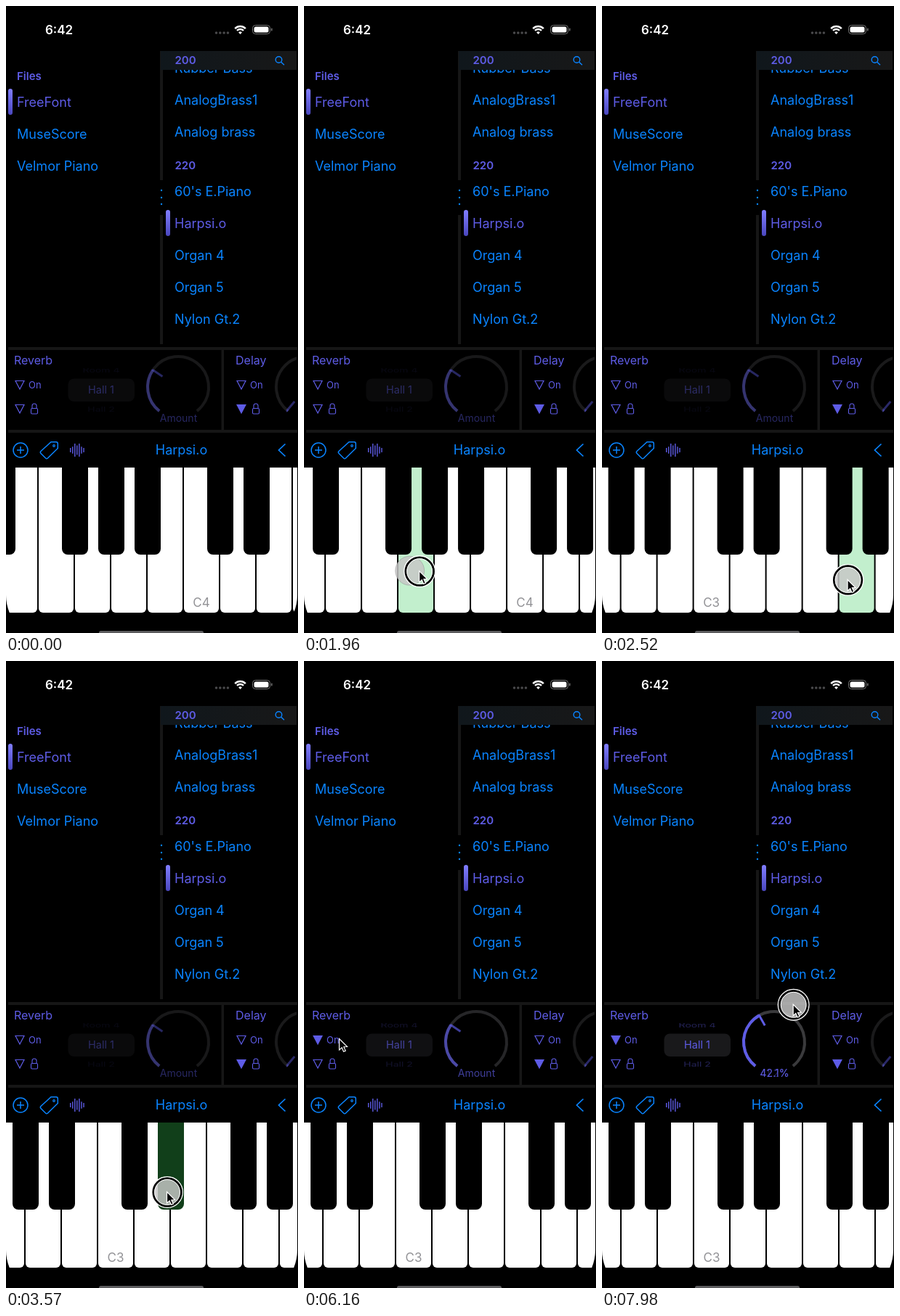
Animation of 402x864 px, one loop 8 s. Source, as an HTML page with a canvas:

```html
<!DOCTYPE html>
<html lang="en">
<head>
<meta charset="utf-8">
<title>Synth keyboard</title>
<style>
html, body { margin: 0; width: 100%; height: 100%; overflow: hidden; background: #000; }
canvas { display: block; width: 402px; height: 864px; }
</style>
</head>
<body>
<canvas id="stage"></canvas>
<script>
const W = 402, H = 864, LOOP = 8000, TICK = 70, KEY = 50, TOUCH_LAG = 27;
const BLUE = '#0a84ff', PURPLE = '#5e5ce6', LINE = '#161616';
const canvas = document.getElementById('stage');
const ctx = canvas.getContext('2d');
const dpr = window.devicePixelRatio || 1;
canvas.width = W * dpr;
canvas.height = H * dpr;

// Quick start and soft landing, like a hand on a mouse.
function ease(t, from, to) {
  const u = Math.min(1, Math.max(0, (t - from) / (to - from)));
  const v = 1 - (1 - u) ** 1.5;
  return v * v * (3 - 2 * v);
}

// The pointer rests between moves.
const moves = [
  { from: 490, to: 770, x: 188, y: 800 },
  { from: 910, to: 1470, x: 96, y: 774 },
  { from: 1766, to: 2590, x: 338, y: 790 },
  { from: 2800, to: 3430, x: 221, y: 731 },
  { from: 3780, to: 4410, x: 152, y: 804 },
  { from: 4850, to: 5180, x: 116, y: 543 },
  { from: 5390, to: 5670, x: 48, y: 520 },
  { from: 6230, to: 7280, x: 258, y: 529 },
  { from: 7430, to: 8200, x: 263, y: 469 }
];

// White and black indexes count white keys from middle C.
const presses = [
  { from: 1680, to: 2660, white: -3 },
  { from: 3570, to: 3850, black: -6 },
  { from: 4480, to: 4760, white: -7 },
  { from: 5880, to: 6020 },
  { from: 7490, to: LOOP }
];

function pointerAt(t) {
  return moves.reduce((p, m) => {
    const k = ease(t, m.from, m.to);
    return { x: p.x + (m.x - p.x) * k, y: p.y + (m.y - p.y) * k };
  }, { x: 198, y: 866 });
}

const middleC = t => 244 + 232 * ease(t, 1832, 2580);
const amount = t => 30.1 + (t < 7430 ? 0 : (529 - pointerAt(t).y) * 0.214);

function text(str, x, y, size, color, align = 'left', weight = 400) {
  ctx.font = `${weight} ${size}px Inter, sans-serif`;
  ctx.textAlign = align;
  ctx.fillStyle = color;
  ctx.fillText(str, x, y);
}

function rect(x, y, w, h, color, radius = 0) {
  ctx.fillStyle = color;
  ctx.beginPath();
  ctx.roundRect(x, y, w, h, radius);
  ctx.fill();
}

function stroke(color, width) {
  ctx.strokeStyle = color;
  ctx.lineWidth = width;
  ctx.stroke();
}

function path(points, closed) {
  ctx.beginPath();
  points.forEach(([x, y]) => ctx.lineTo(x, y));
  if (closed) ctx.closePath();
}

function line(color, width, ...points) {
  path(points);
  stroke(color, width);
}

function arc(x, y, r, color, width, a = 0, b = 2 * Math.PI) {
  ctx.beginPath();
  ctx.arc(x, y, r, a, b);
  stroke(color, width);
}

function disc(x, y, r, color) {
  ctx.fillStyle = color;
  ctx.beginPath();
  ctx.arc(x, y, r, 0, 2 * Math.PI);
  ctx.fill();
}

function gradient(x0, y0, x1, y1, from, to) {
  const g = ctx.createLinearGradient(x0, y0, x1, y1);
  g.addColorStop(0, from);
  g.addColorStop(1, to);
  return g;
}

function withAlpha(alpha, draw) {
  ctx.save();
  ctx.globalAlpha *= alpha;
  draw();
  ctx.restore();
}

function clipped(x, y, w, h, draw, radius = 0) {
  ctx.save();
  ctx.beginPath();
  ctx.roundRect(x, y, w, h, radius);
  ctx.clip();
  draw();
  ctx.restore();
}

function statusBar() {
  text('6:42', 54, 39, 17, '#fff', 'left', 600);
  for (let i = 0; i < 4; i++) disc(289.5 + i * 5.3, 37, 1.8, '#4a4a4c');
  const up = -Math.PI / 2;
  [10.4, 6.4].forEach(r => arc(322.5, 38.5, r, '#fff', 2.5, up - 0.78, up + 0.78));
  arc(322.5, 39, 1.8, '#fff', 3.6, up - 0.75, up + 0.75);
  ctx.beginPath();
  ctx.roundRect(339.5, 26.5, 24, 12, 4);
  stroke('#777', 1);
  rect(341.5, 28.5, 20, 8, '#fff', 2.5);
  rect(365, 30.5, 1.5, 4, '#777', 1);
}

function marker(x, y) {
  rect(x, y, 6, 36, gradient(0, y, 0, y + 36, '#817eff', '#4a47be'), 3);
}

function column(x, y, rows, selected) {
  rows.forEach((s, i) => text(s, x, y + 44 * i, 18, i === selected ? PURPLE : BLUE));
}

function lists() {
  text('Files', 15, 102, 15, PURPLE, 'left', 600);
  marker(3, 114);
  column(15, 139, ['FreeFont', 'MuseScore', 'Velmor Piano'], 0);

  [62, 288].forEach(y => rect(212, y, 4, 178, LINE));
  [254, 264, 273].forEach(y => disc(214, y, 1.2, BLUE));

  rect(213, 62, 187, 26, gradient(213, 0, 400, 0, '#10171c', '#181818'));
  clipped(216, 88, 184, 12, () => text('Rubber Bass', 232, 92, 18, BLUE));
  text('200', 232.5, 80, 15, PURPLE, 'left', 600);
  arc(375.5, 74, 4.3, BLUE, 1.4);
  line(BLUE, 1.5, [378.7, 77.2], [383, 81.3]);

  column(232, 136, ['AnalogBrass1', 'Analog brass']);
  text('220', 232.5, 225, 15, PURPLE, 'left', 600);
  marker(220, 281);
  column(232, 262, ["60's E.Piano", 'Harpsi.o', 'Organ 4', 'Organ 5', 'Nylon Gt.2'], 1);
}

function triangle(x, y, filled) {
  path([[x - 6, y - 5.5], [x + 6, y - 5.5], [x, y + 6]], true);
  if (filled) {
    ctx.fillStyle = PURPLE;
    ctx.fill();
  }
  stroke(PURPLE, 1.2);
}

function switches(title, x, on, locked) {
  text(title, x, 494, 16, PURPLE);
  triangle(x + 8, 522, on);
  text('On', x + 20, 527, 13, PURPLE);
  triangle(x + 8, 555, locked);
  ctx.beginPath();
  ctx.roundRect(x + 23.5, 554.5, 9, 7.5, 1.5);
  ctx.moveTo(x + 25, 554.5);
  ctx.arc(x + 28, 551, 3, Math.PI, 0);
  ctx.lineTo(x + 31, 554.5);
  stroke(PURPLE, 1.1);
}

function knob(x, y, degrees) {
  const rad = d => d * Math.PI / 180;
  const a = rad(degrees), c = Math.cos(a), s = Math.sin(a);
  arc(x, y, 42, '#3a3a3c', 4, rad(128), rad(412));
  arc(x, y, 42, PURPLE, 4, rad(128), a);
  line(PURPLE, 3, [x + 43 * c, y + 43 * s], [x + 26 * c, y + 26 * s]);
}

// Neighbouring wheel entries look tilted away from the viewer.
function wheelEntry(label, y, top) {
  clipped(85, top, 92, 9, () => {
    ctx.translate(131, y);
    ctx.scale(1, 0.62);
    text(label, 0, 0, 14, PURPLE, 'center');
  });
}

function effects(t) {
  rect(3, 470, 398, 4, LINE);
  rect(3, 584, 398, 4, LINE);
  rect(296.5, 474, 3.5, 110, LINE);

  const on = ease(t, 6020, 6440), readout = ease(t, 7420, 7700);
  const value = amount(t), lagged = amount(t - TICK);
  const caption = (str, alpha) => withAlpha(alpha, () => text(str, 237.5, 573, 14, PURPLE, 'center'));

  switches('Reverb', 11, t >= 6020, false);
  withAlpha(0.42 + 0.58 * on, () => {
    rect(85.5, 513.5, 91.5, 31.5, '#19191b', 8);
    text('Hall 1', 131, 534, 14.5, PURPLE, 'center');
    withAlpha(0.2 + 0.18 * on, () => {
      wheelEntry('Room 4', 505, 499);
      wheelEntry('Hall 2', 559, 551);
    });
    knob(237, 525, 214 + (lagged - 30.1) * 2.4);
    caption('Amount', 1 - readout);
    caption(value.toFixed(1) + '%', readout);
    caption(lagged.toFixed(1) + '%', readout * 0.35);
  });

  switches('Delay', 316, false, true);
  clipped(300, 474, 100, 110, () => withAlpha(0.45, () => knob(414, 525, 130)));
}

function toolbar() {
  arc(20, 612, 10, BLUE, 1.5);
  line(BLUE, 1.5, [15, 612], [25, 612]);
  line(BLUE, 1.5, [20, 607], [20, 617]);

  ctx.stroke(new Path2D('M62 600.8H69Q71.3 600.8 71.3 603.2V609.5L57.5 623Q56 624.4 54.5 623L48 616.5Q46.6 615 48 613.5Z'));
  arc(66, 606, 1.3, BLUE, 1.2);

  for (let i = 0; i < 7; i++) {
    const x = 88.7 + i * 3.05;
    const h = 3 + (i % 2 ? 3.5 : 7) * Math.sin(Math.PI * i / 6);
    line(PURPLE, 1.4, [x, 612 - h], [x, 612 + h]);
  }
  text('Harpsi.o', 241.5, 618, 18, BLUE, 'center');
  line(BLUE, 1.7, [384.5, 603.5], [375.5, 612], [384.5, 620.5]);
}

function keyboard(t, press) {
  const left = middleC(t);
  const first = Math.floor(-left / KEY) - 1;
  const keys = Array.from({ length: 11 }, (_, i) => first + i);
  const degree = i => (i + 70) % 7;
  clipped(0, 0, 401, 874, () => {
    for (const i of keys) {
      const x = left + KEY * i;
      rect(x + 1, 636, KEY - 2, 200, press?.white === i ? '#c2efcd' : '#fff', [0, 0, 6, 6]);
      if (degree(i) === 0) text('C' + (4 + i / 7), x + 25, 828, 17, '#929296', 'center');
    }
    for (const i of keys) {
      if (degree(i) === 2 || degree(i) === 6) continue;
      rect(left + KEY * i + 33, 636, 36, 120, press?.black === i ? '#113f1a' : '#000', [0, 0, 8, 8]);
    }
  }, 62);
  rect(128, 861, 144, 5, '#5c5c5e', 2.5);
}

function pointer(t, press) {
  if (t < 560) return;
  const { x, y } = pointerAt(t);
  if (press) {
    const touch = pointerAt(t - TOUCH_LAG);
    disc(touch.x + 1, touch.y + 1, 20, 'rgba(199,199,199,0.83)');
    arc(touch.x + 1, touch.y + 1, 20, 'rgba(120,120,120,0.5)', 0.7);
    arc(x + 1, y + 1, 21.3, '#fff', 1.4);
    arc(x + 1, y + 1, 19.2, '#000', 2.8);
    arc(x + 1, y + 1, 17.4, '#fff', 1);
  }
  ctx.save();
  ctx.translate(x + 0.5, y + 0.5);
  path([[0, 0], [0, 15.5], [3.6, 12.2], [6, 17.8], [8.7, 16.6], [6.3, 11.2], [11, 11]], true);
  ctx.fillStyle = '#000';
  ctx.fill();
  stroke('#fff', 1.2);
  ctx.restore();
}

function draw(now) {
  const t = Math.floor((now % LOOP) / TICK) * TICK;
  const press = presses.find(p => t >= p.from && t < p.to);
  ctx.setTransform(dpr, 0, 0, dpr, 0, 0);
  ctx.fillStyle = '#000';
  ctx.fillRect(0, 0, W, H);
  statusBar();
  lists();
  effects(t);
  toolbar();
  keyboard(t, press);
  pointer(t, press);
}

let start;
function frame(now) {
  start ??= now;
  draw(now - start);
  requestAnimationFrame(frame);
}
requestAnimationFrame(frame);
</script>
</body>
</html>
```
